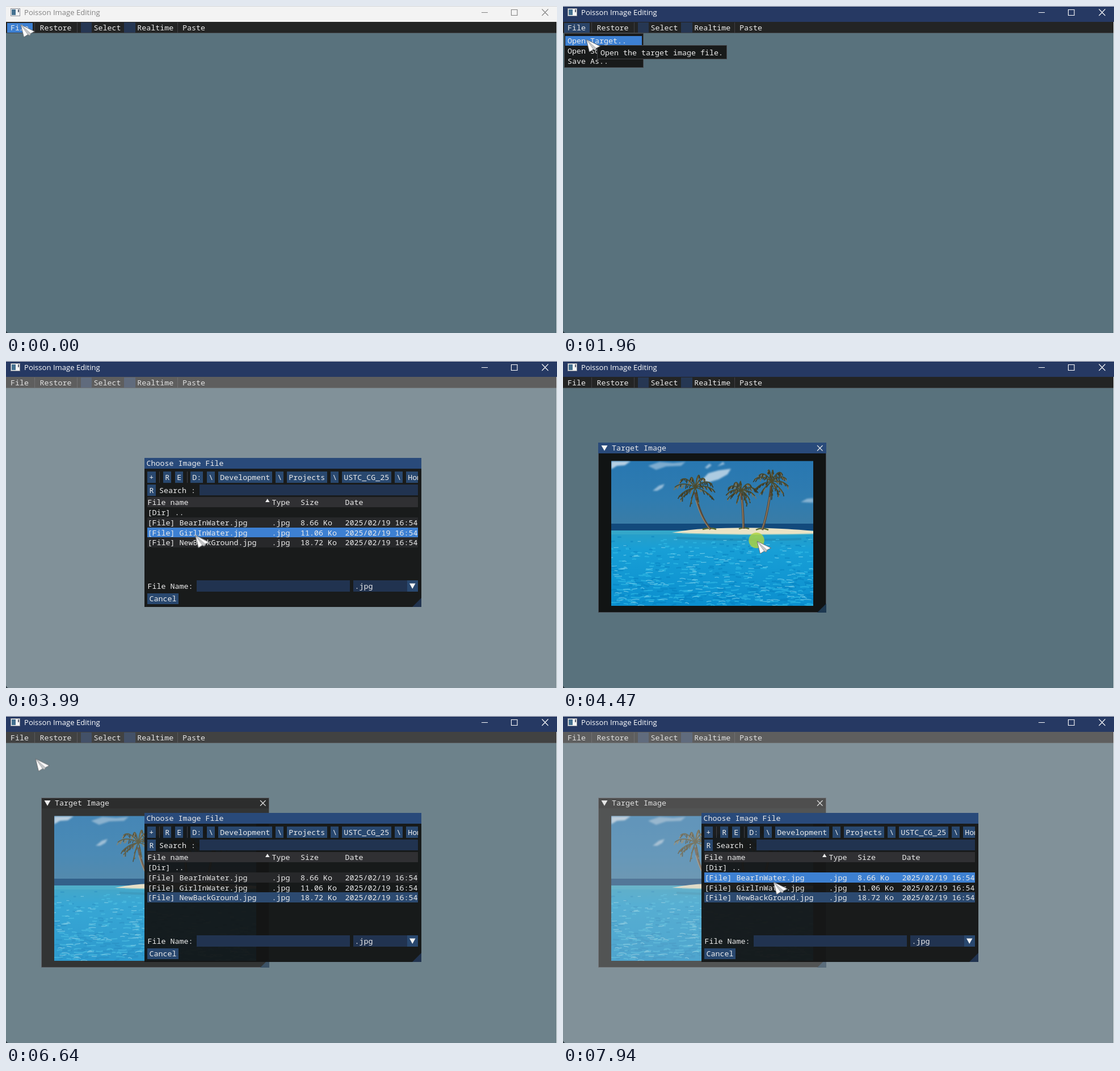
Animation of 971 by 577 pixels, one loop 8 s. Source, as an HTML page:

```html
<!DOCTYPE html>
<html lang="en">
<head>
<meta charset="utf-8">
<title>Poisson Image Editing</title>
<style>
  html, body { margin: 0; width: 100%; height: 100%; overflow: hidden; background: #59727d; }
  svg { display: block; width: 971px; height: 577px; }
  text { font: 13.33px "Noto Sans Mono", "Liberation Mono", monospace; fill: #ececec; white-space: pre; }
  rect { shape-rendering: crispEdges; }
  .caption { font: 13.1px "Open Sans", "Noto Sans", sans-serif; fill: currentColor; }
  .btn { fill: #29486f; }
  .field { fill: #213350; }
  .head { fill: #294a7a; }
  .hot { fill: #3d80d2; }
  .line { fill: #404044; }
  .popup { fill: #181a1a; stroke: #45474b; }
  #bar { animation: bar 8s step-end infinite; }
  #caption { animation: caption 8s step-end infinite; }
  @keyframes bar { 0% { fill: #f3f3f3; } .75%, 100% { fill: #263963; } }
  @keyframes caption { 0% { color: #828282; } .75%, 100% { color: #fff; } }
</style>
</head>
<body>
<svg viewBox="0 0 971 577">
  <defs>
    <linearGradient id="sky" x2="0" y2="1">
      <stop stop-color="#2877b1"/><stop offset=".6" stop-color="#2f7cb0"/><stop offset="1" stop-color="#3a7ca6"/>
    </linearGradient>
    <linearGradient id="sea" x2="0" y2="1">
      <stop stop-color="#2a9fc6"/><stop offset=".25" stop-color="#189fd6"/><stop offset="1" stop-color="#0b8fcf"/>
    </linearGradient>
    <filter id="soft" x="-20%" y="-50%" width="140%" height="200%"><feGaussianBlur stdDeviation="1.8"/></filter>
    <clipPath id="frame"><rect x="85" y="176.5" width="356" height="255.5"/></clipPath>
    <clipPath id="crumbs"><rect x="249" y="190" width="477" height="30"/></clipPath>
  </defs>

  <rect width="971" height="577" fill="#59727d"/>

  <!-- title bar -->
  <rect id="bar" width="971" height="28"/>
  <rect width="971" height="1" fill="#d3d5d9"/>
  <g id="caption">
    <rect x="8.5" y="4.5" width="16" height="13" fill="#f6f6f6" stroke="#8b8f98"/>
    <rect x="10" y="6" width="7" height="10" fill="#44708f"/>
    <rect x="21" y="6" width="2" height="5" fill="#5a6070"/>
    <text class="caption" x="32" y="16">Poisson Image Editing</text>
    <path d="M838 11.5h11M890.5 6.5h10.5v10h-10.5zM944.5 5.5l11 11.5M955.5 5.5l-11 11.5" fill="none" stroke="currentColor" stroke-width="1.1"/>
  </g>

  <!-- menu bar -->
  <rect y="28" width="971" height="19" fill="#232424"/>
  <rect y="47" width="971" height="1" fill="#414649"/>
  <rect id="fileOpen" x="2" y="30" width="45" height="17" fill="#2a4468"/>
  <rect id="fileHot" class="hot" x="2" y="30" width="45" height="17"/>
  <g class="line">
    <rect x="50" y="29" width="1" height="18"/><rect x="125" y="29" width="1" height="18"/><rect x="302" y="29" width="1" height="18"/>
  </g>
  <g fill="#263753"><rect x="132" y="29" width="19" height="18"/><rect x="208" y="29" width="20" height="18"/></g>
  <text x="8" y="43">File</text>
  <text x="59.5" y="43">Restore</text>
  <text x="154.5" y="43">Select</text>
  <text x="231.3" y="43">Realtime</text>
  <text x="311" y="43">Paste</text>

  <!-- image window -->
  <g id="target">
    <rect x="62.5" y="144.5" width="401" height="299" fill="#111414" stroke="#4a4f57"/>
    <rect x="63" y="145" width="400" height="18" fill="#0a0b0b"/>
    <rect id="focus" class="head" x="62" y="144" width="402" height="19"/>
    <path d="M67.5 149h11l-5.5 9.5z" fill="#f2f2f2"/>
    <text x="86" y="158">Target Image</text>
    <path d="M448 149l9.5 9.5M457.5 149l-9.5 9.5" stroke="#e6e6e6" stroke-width="1.2"/>
    <path d="M464 444h-16l16-16z" fill="#1d3850"/>
    <g id="photo" clip-path="url(#frame)">
      <rect x="85" y="176" width="356" height="112" fill="url(#sky)"/>
      <g fill="#cfe0ee" filter="url(#soft)">
        <path d="M85 177h34l-10 7-14 1-10 6z" opacity=".85"/>
        <path d="M150 185l20-7 24 2 22-2-8 7-26 1-18 6z" opacity=".5"/>
        <path d="M244 211l12-13 18-5 22-3-6 10-16 9-18 5z" opacity=".8"/>
        <path d="M250 188l8-7 4 3-8 6zM272 186l10-8 3 4z" opacity=".65"/>
        <path d="M158 229l11-9 10-3-4 7-9 5z" opacity=".65"/>
        <path d="M419 249l11-6 11-1v8z" opacity=".55"/>
      </g>
      <rect x="85" y="287" width="356" height="13" fill="#124a7c"/>
      <rect x="85" y="299" width="356" height="134" fill="url(#sea)"/>
      <path d="M85 299h140v7h-140z" fill="#40afcb" opacity=".5"/>
      <path d="M192 303q30-6 60-7 60-3 110-1 50 2 80 5v5q-120 2-190 0z" fill="#ebe3c4"/>
      <path d="M210 304q120 4 231 1" fill="none" stroke="#7cc3c6" stroke-width="1.5"/>
      <path d="M246 297q14-4 24 0M310 296q10-3 18 0M340 298q10-5 22 0" fill="none" stroke="#59692f" stroke-width="2.5"/>
      <path d="M200 312q120 6 220 2" fill="none" stroke="#1b7ea8" stroke-width="4" opacity=".45"/>
      <path d="M233 232q8 42 27 65M314 232q4 34 4 64M367 220q-6 48-16 78" fill="none" stroke="#5a4a39" stroke-width="4"/>
      <path d="M234 246q9 32 25 51M315 245q3 28 2 51M364 240q-5 36-14 58" fill="none" stroke="#99866c" stroke-width="1.3"/>
    </g>
  </g>

  <rect id="dim" y="28" width="971" height="549" fill="#ccc"/>

  <!-- file dialog -->
  <g id="dialog">
    <rect x="244" y="171" width="488" height="263" fill="#131414" fill-opacity=".94"/>
    <rect class="head" x="244" y="171" width="488" height="19"/>
    <text x="247.5" y="185">Choose Image File</text>
    <g id="path" clip-path="url(#crumbs)">
      <rect class="line" x="270" y="195" width="1" height="20"/><rect class="line" x="319" y="195" width="1" height="20"/>
    </g>
    <rect class="btn" x="249" y="218" width="15" height="20"/>
    <text x="252.5" y="232.5">R</text>
    <text x="270" y="232.5">Search :</text>
    <rect class="field" x="341" y="218" width="385" height="19"/>
    <rect x="249" y="240" width="477" height="18" fill="#303033"/>
    <text x="249.5" y="254">File name</text>
    <path d="M457 249h7.5l-3.75-6z" fill="#f0f0f0"/>
    <text x="468.5" y="254">Type</text><text x="519" y="254">Size</text><text x="597.5" y="254">Date</text>
    <g id="rows"></g>
    <text x="249.5" y="402">File Name:</text>
    <rect class="field" x="336" y="387" width="270" height="20"/>
    <rect class="field" x="612" y="387" width="95" height="20"/>
    <rect class="btn" x="707" y="387" width="19" height="20"/>
    <path d="M711 392.5h10.5l-5.25 9.5z" fill="#f4f4f4"/>
    <text x="614.5" y="402">.jpg</text>
    <rect class="btn" x="249" y="410" width="55" height="19"/>
    <text x="252.5" y="424">Cancel</text>
    <path d="M732 434h-16l16-16z" fill="#21334f"/>
  </g>

  <!-- File menu -->
  <g id="menu">
    <rect class="popup" x="2.5" y="48.5" width="139" height="60"/>
    <rect id="item1" class="hot" x="4" y="53" width="135" height="17"/>
    <rect id="item2" class="hot" x="4" y="70" width="135" height="18"/>
    <text x="8" y="66">Open Target..</text>
    <text x="8" y="83.5">Open Source..</text>
    <text x="8" y="101.5">Save As..</text>
  </g>

  <rect x="970" width="1" y="28" height="549" fill="#e6eaec"/>
  <path d="M0 573v4h4q-3-1-4-4z" fill="#26323a"/>

  <!-- pointer with its tooltips and click mark -->
  <g id="pointer">
    <g id="tip1">
      <rect class="popup" x="19.5" y="10.5" width="228" height="24"/>
      <text x="25" y="27.5">Open the target image file.</text>
    </g>
    <g id="tip2">
      <rect class="popup" x="19.5" y="10.5" width="484" height="40"/>
      <text x="25" y="28">Open the source image file. This is available only when the</text>
      <text x="25" y="42.7">target image is loaded.</text>
    </g>
    <circle id="click" cx="-1" cy="-1.5" r="13.7" fill="#b2d43c" fill-opacity=".8"/>
    <path d="M0 0L24.5 12 17.5 15.5 16 19 12.5 17.5 5.5 22z" fill="#fafafa" stroke="#66696c" stroke-width=".9" stroke-linejoin="round"/>
    <path d="M.8.8L17.5 15.5 16 19 12.5 17.5z" fill="#c4c6c8" stroke="#77797c" stroke-width=".5"/>
  </g>
</svg>

<script>
const $ = id => document.getElementById(id);
const LOOP = 8000;
const add = (id, markup) => $(id).insertAdjacentHTML('beforeend', markup);

// path buttons: x, width, label
[[249, 15, '+'], [277, 14, 'R'], [298, 14, 'E'], [325, 22, 'D:'], [354, 14, '\\'],
 [374, 95, 'Development'], [475, 14, '\\'], [495, 71, 'Projects'], [572, 14, '\\'],
 [592, 87, 'USTC_CG_25'], [685, 14, '\\'], [705, 90, 'Homeworks']
].forEach(([x, w, label]) => add('path',
  `<rect class="btn" x="${x}" y="195" width="${w}" height="20"/><text x="${x + 3.3}" y="210">${label}</text>`));

// file list
[['[Dir] ..', '', ''], ['[File] BearInWater.jpg', '.jpg', '8.66 Ko'],
 ['[File] GirlInWater.jpg', '.jpg', '11.06 Ko'], ['[File] NewBackGround.jpg', '.jpg', '18.72 Ko']
].forEach(([name, type, size], i) => {
  const y = Math.round(258.3 + i * 17.7);
  const band = extra => `<rect x="249" y="${y}" width="477" height="18" ${extra}/>`;
  const cell = (x, s) => s && `<text x="${x}" y="${y + 14}">${s}</text>`;
  add('rows', (i % 2 ? band('fill="#27282a"') : '') +
    (i === 3 ? band('id="chosen" fill="#2c4a70"') : '') +
    band(`id="row${i}" class="hot"`) +
    cell(249.5, name) + cell(468.5, type) + cell(519, size) + cell(597.5, type && '2025/02/19 16:54'));
});

// photo details
let seed = 7;
const rnd = () => (seed = seed * 16807 % 2147483647) / 2147483647;
const stroke = (d, color, width, alpha = 1) => add('photo',
  `<path d="${d}" fill="none" stroke="${color}" stroke-width="${width}" opacity="${alpha}"/>`);
const at = (x, y) => `${x.toFixed(1)} ${y.toFixed(1)}`;

function ripples(count, color, width, alpha) {
  let d = '';
  for (let i = 0; i < count; i++) {
    const depth = rnd() ** .8, len = 4 + 14 * depth * rnd() + 3 * rnd();
    d += `M${at(80 + rnd() * 360, 310 + depth * 122)}q${at(len / 2, (rnd() - .6) * 6 * depth)} ${at(len, (rnd() - .5) * 4 * depth)}`;
  }
  stroke(d, color, width, alpha);
}
ripples(220, '#0478b8', 2.4, .4);
ripples(260, '#35bfe8', 2, .6);
ripples(150, '#8adcf2', 1.2, .65);

function palm(cx, cy, r, count) {
  let spine = '', leaf = '', dry = '';
  for (let i = 0; i < count; i++) {
    const a = i / count * 2 * Math.PI + rnd() * .35, len = r * (.8 + rnd() * .25);
    const mx = Math.cos(a) * len * .6, my = Math.sin(a) * len * .65 - 7;
    const ex = Math.cos(a) * len, ey = Math.sin(a) * len * .75 + 5;
    spine += `M${at(cx, cy)}q${at(mx, my)} ${at(ex, ey)}`;
    for (let t = .2; t <= 1; t += .09) {
      const x = cx + 2 * t * (1 - t) * mx + t * t * ex;
      const y = cy + 2 * t * (1 - t) * my + t * t * ey;
      const part = `M${at(x, y)}l${at(Math.cos(a) * 3 + (rnd() - .5) * 4, 3 + rnd() * 5)}`;
      if (rnd() < .3) dry += part; else leaf += part;
    }
  }
  stroke(leaf, '#3c3a26', 1.6);
  stroke(dry, '#8f7446', 1.2);
  stroke(spine, '#4b4a2c', 1.7);
}
palm(233, 223, 35, 12);
palm(314, 229, 27, 11);
palm(368, 213, 34, 12);

// timeline: keyframes from [ms, value] pairs
const sheet = document.head.appendChild(document.createElement('style'));
function track(id, prop, keys, easing) {
  const steps = keys.map(([ms, v]) => `${ms / LOOP * 100}% { ${prop}: ${v}; }`).join(' ');
  sheet.append(`@keyframes k-${id} { ${steps} }\n#${id} { animation: k-${id} ${LOOP}ms ${easing} infinite; }\n`);
}
const show = (id, ...times) =>
  track(id, 'opacity', [...(times[0] ? [[0, 0]] : []), ...times.map((ms, i) => [ms, 1 - i % 2])], 'step-end');

show('fileOpen', 60, 2560, 5490, 6570);
show('fileHot', 0, 490, 900, 1080, 5220, 5810);
show('menu', 60, 2560, 5490, 6570);
show('item1', 520, 870, 1220, 2560, 5900, 6190);
show('tip1', 520, 870, 1220, 2560, 5900, 6190);
show('item2', 6190, 6570);
show('tip2', 6190, 6570);
show('click', 60, 130, 2490, 2560, 4330, 4400, 4470, 4540, 5490, 5550, 6510, 6570);
show('dialog', 2620, 4470, 6570);
show('target', 4470);
show('focus', 4470, 5490);
show('chosen', 4330);
show('row0', 3645, 3710, 7220, 7550);
show('row1', 3710, 3800, 7550);
show('row2', 3800, 4035);
show('row3', 4035, 4470);
track('dim', 'opacity', [[0, 0], [2620, .04], [2690, .175], [2760, .35], [4470, 0],
  [6570, .04], [6640, .175], [6710, .35]], 'step-end');

const stops = [[0, 26, 33], [330, 26, 33], [600, 46, 59], [800, 45, 59], [940, 32, 44], [1080, 33, 48],
  [1360, 41, 58], [1930, 41, 58], [1960, 41, 59], [3060, 41, 59], [3850, 325, 297], [4130, 342, 318],
  [4710, 342, 318], [5290, 14, 41], [5660, 14, 41], [6230, 50, 72], [6370, 52, 75.5], [6750, 52, 75.5],
  [7250, 345, 264], [7320, 346, 266], [7940, 371, 293], [8000, 371, 293]];
const glide = [3060, 4710, 6750];
track('pointer', 'transform', stops.map(([ms, x, y]) =>
  [ms, `translate(${x}px, ${y}px)` + (glide.includes(ms) ? '; animation-timing-function: ease-in-out' : '')]), 'linear');
</script>
</body>
</html>
```
